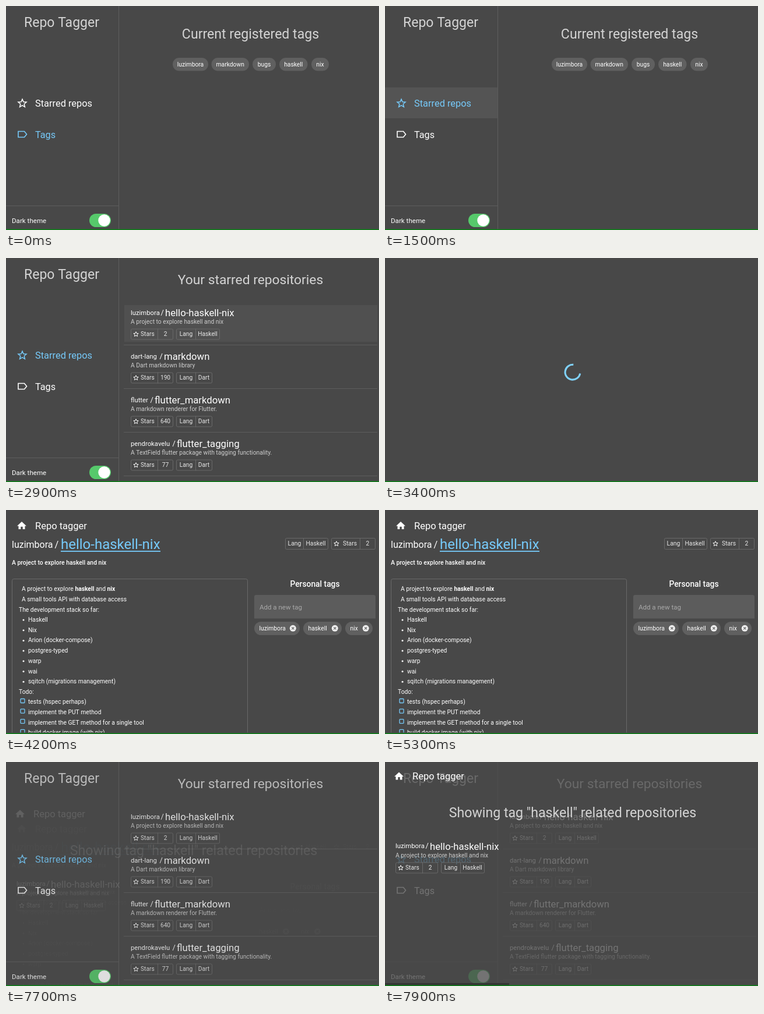
These frames come from a looping animation (640x385 px, 8 s). An HTML page with a canvas:

```html
<!DOCTYPE html>
<html lang="en">
<head>
<meta charset="utf-8">
<title>Repo Tagger</title>
<style>
  html, body { margin: 0; width: 100%; height: 100%; overflow: hidden; background: #484848; }
  canvas { display: block; width: 640px; height: 385px; }
</style>
</head>
<body>
<canvas id="stage"></canvas>
<script>
const W = 640, H = 385, LOOP = 8000;
const BG = '#484848', LINE = '#5d5d5d', EDGE = '#696969', CHIP = '#606060';
const BLUE = '#76cafa', TITLE = '#d4d4d4', SOFT = '#cdcdcd', WHITE = '#fff';
const USER = 'luzimbora';
const REPOS = [
  { owner: USER, name: 'hello-haskell-nix', x: 59, about: 'A project to explore haskell and nix', stars: 2, lang: 'Haskell' },
  { owner: 'dart-lang', name: 'markdown', x: 57, about: 'A Dart markdown library', stars: 190, lang: 'Dart' },
  { owner: 'flutter', name: 'flutter_markdown', x: 41, about: 'A markdown renderer for Flutter.', stars: 640, lang: 'Dart' },
  { owner: 'pendrokavelu', name: 'flutter_tagging', x: 79, about: 'A TextField flutter package with tagging functionality.', stars: 77, lang: 'Dart' }
];

const stage = document.getElementById('stage');
const dpr = window.devicePixelRatio || 1;
function prepare(canvas) {
  canvas.width = Math.round(W * dpr);
  canvas.height = Math.round(H * dpr);
  return canvas.getContext('2d');
}
const main = prepare(stage);
const buffer = document.createElement('canvas');
const back = prepare(buffer);
let g = main;

const clamp = v => Math.max(0, Math.min(1, v));
const ramp = (t, from, to) => clamp((t - from) / (to - from));

// cubic-bezier(.4, 0, .2, 1)
function ease(x) {
  if (x >= 1) return 1;
  let lo = 0, hi = 1;
  for (let i = 0; i < 18; i++) {
    const u = (lo + hi) / 2;
    const bx = 1.2 * u * (1 - u) ** 2 + 0.6 * u * u * (1 - u) + u ** 3;
    if (bx < x) lo = u; else hi = u;
  }
  return lo * lo * (3 - 2 * lo);
}

function layer(alpha, dy, draw) {
  if (alpha <= 0) return;
  if (alpha >= 1 && !dy) { draw(); return; }
  back.setTransform(dpr, 0, 0, dpr, 0, 0);
  back.clearRect(0, 0, W, H);
  back.translate(0, dy);
  g = back;
  draw();
  g = main;
  g.globalAlpha = alpha;
  g.drawImage(buffer, 0, 0, W, H);
  g.globalAlpha = 1;
}

function text(s, x, y, size, color = WHITE, align = 'left', weight = 400) {
  g.font = `${weight} ${size}px Roboto, "Liberation Sans", sans-serif`;
  g.textAlign = align;
  g.fillStyle = color;
  g.fillText(s, x, y);
  return g.measureText(s).width;
}
function rect(x, y, w, h, color) {
  g.fillStyle = color;
  g.fillRect(x, y, w, h);
}
function round(x, y, w, h, r) {
  g.beginPath();
  g.roundRect(x, y, w, h, r);
}
function fillRound(x, y, w, h, r, color) {
  round(x, y, w, h, r);
  g.fillStyle = color;
  g.fill();
}
function strokeRound(x, y, w, h, r, color = EDGE, width = 1) {
  round(x, y, w, h, r);
  g.strokeStyle = color;
  g.lineWidth = width;
  g.stroke();
}
function disc(x, y, r, color) {
  g.beginPath();
  g.arc(x, y, r, 0, 7);
  g.fillStyle = color;
  g.fill();
}
function poly(points, color, width) {
  g.beginPath();
  points.forEach(([x, y]) => g.lineTo(x, y));
  g.closePath();
  g.lineJoin = 'miter';
  g.strokeStyle = g.fillStyle = color;
  g.lineWidth = width;
  if (width) g.stroke(); else g.fill();
}

function star(x, y, r, color, width) {
  const points = [];
  for (let i = 0; i < 10; i++) {
    const a = i * Math.PI / 5 - Math.PI / 2, d = i % 2 ? r * 0.45 : r;
    points.push([x + d * Math.cos(a), y + d * Math.sin(a)]);
  }
  poly(points, color, width);
}
function houseIcon(x, y) {
  poly([[x, y - 7], [x + 8, y + 0.5], [x + 5.5, y + 0.5], [x + 5.5, y + 6], [x + 1.7, y + 6], [x + 1.7, y + 1.7],
    [x - 1.7, y + 1.7], [x - 1.7, y + 6], [x - 5.5, y + 6], [x - 5.5, y + 0.5], [x - 8, y + 0.5]], WHITE, 0);
}
function tagIcon(x, y, color) {
  poly([[x - 7, y - 5], [x + 3.5, y - 5], [x + 7.5, y], [x + 3.5, y + 5], [x - 7, y + 5]], color, 1.6);
}

function starsBadge(x, y, w, h, split, count, size) {
  const base = y + h / 2 + size * 0.36;
  strokeRound(x + 0.5, y + 0.5, w, h, 2);
  rect(x + split, y, 1, h + 1, EDGE);
  star(x + 9, y + h / 2 + 0.6, 4.4, WHITE, 1);
  text('Stars', x + split - 29, base, size, '#e8e8e8');
  text(count, x + (split + w) / 2 + 0.5, base, size, '#e8e8e8', 'center');
}
function langBadge(x, y, w, h, split, lang, size) {
  const base = y + h / 2 + size * 0.36;
  strokeRound(x + 0.5, y + 0.5, w, h, 2);
  rect(x + split, y, 1, h + 1, EDGE);
  text('Lang', x + split / 2 + 0.5, base, size, '#e8e8e8', 'center');
  text(lang, x + (split + w) / 2 + 0.5, base, size, '#e8e8e8', 'center');
}
function repoRow(repo, x, y) {
  text(repo.owner, x, y, 11.3);
  text('/', x + repo.x - 7.5, y, 13);
  text(repo.name, x + repo.x, y + 2.5, 16.7);
  text(repo.about, x, y + 15.5, 10.3, SOFT);
  starsBadge(x, y + 24, 72, 18, 46, repo.stars, 10.2);
  langBadge(x + 78, y + 24, repo.lang === 'Dart' ? 61 : 74, 18, 33, repo.lang, 10.2);
}

function sidebar(t) {
  const starred = t >= 1500;
  const hover = ramp(t, 1350, 1500) * (1 - ramp(t, 2250, 2450));
  rect(0, 140, 193, 53, `rgba(255,255,255,${0.065 * hover})`);
  text('Repo Tagger', 95.5, 36, 23, TITLE, 'center');
  const first = starred ? BLUE : WHITE, second = starred ? WHITE : BLUE;
  star(28, 167.5, 7.4, first, 1.5);
  text('Starred repos', 50, 173, 16.4, first);
  tagIcon(28, 220.5, second);
  text('Tags', 50, 226.5, 16.2, second);
  rect(193, 0, 1, 384, LINE);
  rect(0, 343, 193, 1, LINE);
  text('Dark theme', 10, 373, 11.6);
  fillRound(143, 357, 37, 23, 11.5, '#56c96b');
  disc(168.5, 368.5, 10.2, '#fff');
}

function tagList() {
  text('Current registered tags', 419.5, 56, 23.1, TITLE, 'center');
  [[USER, 286, 61], ['markdown', 352.5, 64.5], ['bugs', 423, 40], ['haskell', 469, 48.5], ['nix', 524, 30]].forEach(([s, x, w]) => {
    fillRound(x, 89, w, 22.5, 11.2, CHIP);
    text(s, x + w / 2, 104, 10.3, WHITE, 'center');
  });
}

function starredList(t) {
  const hover = ramp(t, 2250, 2450);
  rect(203, 81, 434, 63, `rgba(255,255,255,${0.045 * hover})`);
  text('Your starred repositories', 419.5, 45, 22.8, TITLE, 'center');
  REPOS.forEach((repo, i) => {
    repoRow(repo, 214, 97.5 + i * 75);
    rect(202, 149 + i * 75, 435, 1, LINE);
  });
}

function homePage(t) {
  rect(0, 0, W, H, BG);
  sidebar(t);
  const mix = ramp(t, 1500, 2000);
  layer(1 - mix, 0, tagList);
  layer(mix, 0, () => starredList(t));
}

// Home as it looks again after the details close
function settledHome() {
  rect(0, 0, W, H, BG);
  sidebar(7000);
  starredList(0);
}

function spinner(t) {
  const head = 270 * ease(ramp(t, 2900, 3500));
  const tail = 270 * ease(ramp(t, 3500, 4150));
  const start = (10 + (t - 3400) * 0.27 + tail) * Math.PI / 180;
  g.beginPath();
  g.arc(322, 196.2, 12.9, start, start + Math.max(0.02, (head - tail) * Math.PI / 180));
  g.strokeStyle = '#80d2fb';
  g.lineWidth = 3.1;
  g.stroke();
}

function header(x, y) {
  houseIcon(x, y);
  text('Repo tagger', x + 23, y + 6, 16.5);
}

function inputChip(label, x, w) {
  fillRound(x, 192, w, 23, 11.5, CHIP);
  text(label, x + 8.5, 207, 10.3);
  const cx = x + w - 11.7, cy = 203.3, d = 2.1;
  disc(cx, cy, 5.5, '#f0f0f0');
  g.beginPath();
  g.moveTo(cx - d, cy - d); g.lineTo(cx + d, cy + d);
  g.moveTo(cx + d, cy - d); g.lineTo(cx - d, cy + d);
  g.strokeStyle = CHIP;
  g.lineWidth = 1.2;
  g.stroke();
}

function readme() {
  g.save();
  g.beginPath();
  g.rect(0, 110, 420, 272.5);
  g.clip();
  strokeRound(10.5, 118.5, 404, 300, 3);
  let x = 27;
  [['A project to explore ', 400], ['haskell', 700], [' and ', 400], ['nix', 700]].forEach(([s, weight]) => {
    x += text(s, x, 139, 10.3, WHITE, 'left', weight);
  });
  text('A small tools API with database access', 27, 157, 10.3);
  text('The development stack so far:', 22, 174.5, 10.3);
  ['Haskell', 'Nix', 'Arion (docker-compose)', 'postgres-typed', 'warp', 'wai', 'sqitch (migrations management)'].forEach((s, i) => {
    const y = 192 + i * 17.7;
    disc(30, y - 3, 1.5, WHITE);
    text(s, 38, y, 10.3);
  });
  text('Todo:', 22, 315.5, 10.3);
  ['tests (hspec perhaps)', 'implement the PUT method', 'implement the GET method for a single tool', 'build docker image (with nix)'].forEach((s, i) => {
    const y = 333.3 + i * 17.6;
    strokeRound(25, y - 8.8, 7, 7, 1, BLUE, 1.3);
    text(s, 38, y, 10.3);
  });
  g.restore();
}

function details(t) {
  header(27, 27);
  text(USER, 10, 64.5, 16);
  text('/', 83.5, 64.5, 16.5);
  text('hello-haskell-nix', 94, 67, 24, BLUE);
  rect(94, 70, 171, 1.8, BLUE);
  text('A project to explore haskell and nix', 10, 93.5, 10.4, WHITE, 'left', 500);
  langBadge(479, 48, 73, 19, 31, 'Haskell', 10.4);
  starsBadge(558, 48, 75, 19, 49, 2, 10.4);
  readme();
  text('Personal tags', 530, 131.5, 13.8, WHITE, 'center', 500);
  fillRound(426, 146, 208, 40.5, [3, 3, 0, 0], '#5c5c5c');
  text('Add a new tag', 435, 170.5, 11.5, '#a9a9a9');
  if (t < 6300) {
    inputChip(USER, 426, 78);
    inputChip('haskell', 510, 66);
    inputChip('nix', 582, 47);
  } else {
    inputChip('haskell', 426, 66);
    inputChip('nix', 498, 48);
  }
  const tip = ramp(t, 5950, 6100) * (1 - ramp(t, 6250, 6400));
  if (tip > 0) {
    g.globalAlpha = tip;
    fillRound(466, 220, 54, 23, 3, 'rgba(255,255,255,.9)');
    text('Delete', 493, 235.3, 10.3, '#111', 'center');
    g.globalAlpha = 1;
  }
}

function detailPage(t) {
  const open = ramp(t, 2950, 3250);
  const rest = 1 - ramp(t, 7450, 7750);
  const show = ramp(t, 3750, 4200);
  const shift = 96 * (2 - ease(open) - ease(rest));
  layer((open * rest) ** 2, shift, () => {
    rect(0, -H, W, 3 * H, BG);
    if (show <= 0) spinner(t);
    else if (show >= 1) details(t);
  });
  if (show > 0 && show < 1) {
    layer(1 - show, 0, () => spinner(t));
    layer(show, 0, () => details(t));
  }
}

// The backdrop covers the home page more slowly than the content appears
function tagPage(t) {
  const p = ramp(t, 7600, 7960);
  layer(p ** 1.5, 0, () => rect(0, 0, W, H, BG));
  layer(ramp(p, 0.1, 0.8) ** 1.5, 96 * (1 - ease(p)) - 2.2, () => {
    header(24, 25);
    text('Showing tag "haskell" related repositories', 322, 96, 23.15, TITLE, 'center');
    repoRow(REPOS[0], 18, 149);
  });
  if (t >= 7800) rect(0, 380, 213, 4, '#343434');
}

function render(t) {
  g = main;
  g.setTransform(dpr, 0, 0, dpr, 0, 0);
  if (t < 3250) homePage(t);
  else settledHome();
  if (t >= 2950 && t < 7750) detailPage(t);
  if (t > 7600) tagPage(t);
  rect(0, 383.5, W, 1.5, '#0b8016');
}

let began = null;
function tick(now) {
  if (began === null) began = now;
  render((now - began) % LOOP);
  requestAnimationFrame(tick);
}
render(0);
requestAnimationFrame(tick);
</script>
</body>
</html>
```
